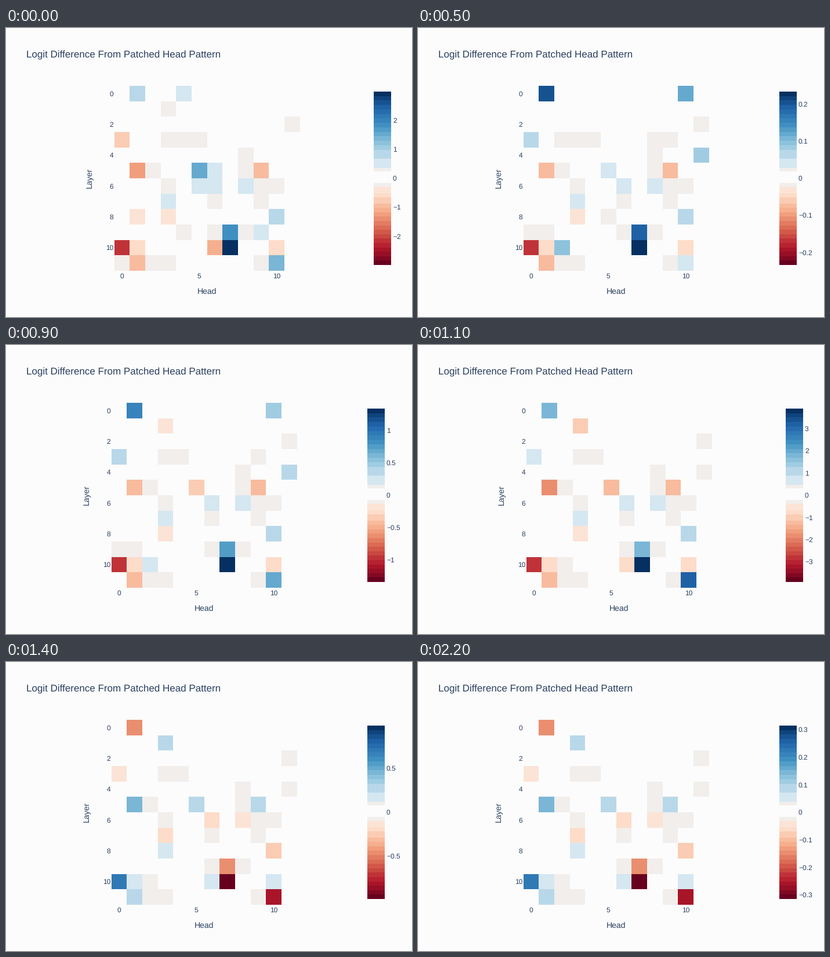
A matplotlib script that plays this animation: 700 by 500 pixels, repeating every 2.3 s.

```python
import math

import matplotlib.pyplot as plt
import numpy as np
from matplotlib.animation import FuncAnimation
from matplotlib.colors import BoundaryNorm, ListedColormap

W, H, DPI = 700, 500, 100
FRAMES, INTERVAL = 23, 100
PAPER, INK = "#fcfcfc", "#2a3f5f"
CELL = 320 / 12
TOP, MID = 100, 260

# Layout by number of decimals on the colour bar labels.
GRID_X = (186.5, 181.5, 178.5)
BAR_X = (634, 623, 617)

plt.rcParams.update({"font.family": "Liberation Sans", "text.hinting": "none"})

# Half-width of the colour range over time.
SPAN_AT = (0, 3, 6, 11, 14, 18, 22)
SPANS = (2.99, 0.1765, 0.2693, 3.91, 0.987, 0.4317, 0.3145)

# Cell levels are percentages of the colour range, keyed by (layer, head).
POSE_AT = (0, 3, 6, 11)
FLIP_AT = 13
FAINT = 9
STEADY = {
    (5, 9): -32, (6, 6): 18, (6, 8): 17, (7, 3): 18, (8, 3): -14, (8, 10): 25,
    (10, 0): -70, (10, 1): -18, (10, 7): 99, (10, 10): -18, (11, 1): -31,
}
MOVING = {
    (0, 1): (26, 54, 100, 45),
    (0, 10): (0, -14, 85, 0),
    (1, 3): (9, 18, 0, -25),
    (3, 0): (-27, 0, 38, 16),
    (4, 11): (0, 0, 52, 9),
    (5, 1): (-44, -72, -14, -45),
    (5, 5): (49, 73, -14, -32),
    (9, 7): (60, 98, 73, 47),
    (10, 2): (0, 61, 34, 9),
    (10, 6): (-38, -47, 18, -20),
    (11, 10): (44, 18, 9, 80),
}
WEAK = {2: [11], 3: [3, 4], 4: [8], 5: [2, 8], 6: [3, 9, 10], 7: [6, 9],
        9: [6, 8], 11: [2, 3, 9]}
SCATTER = (8, 10, 14, 0)  # extra faint cells per pose


def build_poses():
    rng = np.random.default_rng(4)
    poses = np.zeros((len(POSE_AT), 12, 12))
    for (layer, head), level in {**STEADY, **MOVING}.items():
        poses[:, layer, head] = level
    for layer, heads in WEAK.items():
        poses[:, layer, heads] = FAINT
    for pose, count in zip(poses, SCATTER):
        free = np.argwhere(pose == 0)
        for layer, head in rng.permutation(free)[:count]:
            pose[layer, head] = rng.choice([FAINT, FAINT, 18, -14])
    return poses


POSES = build_poses()


def grid_at(i):
    """Blend neighbouring poses; every sign turns over late in the loop."""
    u = np.interp(i, POSE_AT, range(len(POSE_AT)))
    a = int(u)
    b = min(a + 1, len(POSES) - 1)
    grid = POSES[a] + (POSES[b] - POSES[a]) * (u - a)
    return -grid if i >= FLIP_AT else grid


def span_at(i):
    return math.exp(np.interp(i, SPAN_AT, np.log(SPANS)))


def tick_step(span):
    rough = span / 4
    base = 10 ** math.floor(math.log10(rough))
    return next(m * base for m in (1, 2, 5, 10) if m * base >= rough)


# Flat colour bands: narrow at the strong ends, wider near zero.
EDGES = np.concatenate([np.linspace(-100, -29, 15), [-22, -17, -10, -5.3],
                        [8, 12, 23], np.linspace(33, 100, 14)])
LEVELS = (EDGES[:-1] + EDGES[1:]) / 2
LEVELS[0], LEVELS[-1] = -100, 100


def band_color(level):
    if -5.3 < level < 8:
        return PAPER
    if -10 < level < 12:
        return "#f1eeec"
    return plt.get_cmap("RdBu")((level + 100) / 200)


CMAP = ListedColormap([band_color(v) for v in LEVELS])
NORM = BoundaryNorm(EDGES, len(LEVELS))


def pixel(v):
    return np.floor(np.asarray(v) + 0.501)


fig = plt.figure(figsize=(W / DPI, H / DPI), dpi=DPI, facecolor=PAPER)
ax = fig.add_axes([0, 0, 1, 1])


def label(x, y, s, px=12, **kw):
    ax.text(x, y, s, fontsize=px * 72 / DPI, color=INK, va="baseline", **kw)


def mesh(x, y, values):
    ax.pcolormesh(pixel(x), pixel(y), values, cmap=CMAP, norm=NORM,
                  edgecolors="none", antialiased=False)


def draw(i):
    ax.clear()
    ax.axis("off")
    span = span_at(i)
    step = tick_step(span)
    places = min(2, max(0, -math.floor(math.log10(step) + 1e-9)))
    left, bar = GRID_X[places], BAR_X[places]
    cuts = np.arange(13) * CELL

    mesh(left + cuts, TOP + cuts, grid_at(i))
    mesh([bar, bar + 30], MID - 1.5 * EDGES, LEVELS[:, None])

    label(35, 50, "Logit Difference From Patched Head Pattern", 17)
    for n in range(0, 12, 2):
        label(left - 1, TOP + (n + 0.5) * CELL + 4.2, str(n), ha="right")
    for n in (0, 5, 10):
        label(left + (n + 0.5) * CELL, 433, str(n), ha="center")
    label(left + 160, 460, "Head", 14, ha="center")
    label(left - 38.5, MID - 0.5, "Layer", 14, ha="center",
          rotation=90, rotation_mode="anchor")

    top = int(span / step)
    for k in range(-top, top + 1):
        text = f"{k * step:g}".replace("-", "\u2212")
        label(bar + 33, MID - 150 * k * step / span + 4.2, text)
    ax.set(xlim=(0, W), ylim=(H, 0))
    return []


anim = FuncAnimation(fig, draw, frames=FRAMES, interval=INTERVAL,
                     init_func=lambda: [], repeat=True, repeat_delay=0)
plt.show()
```
